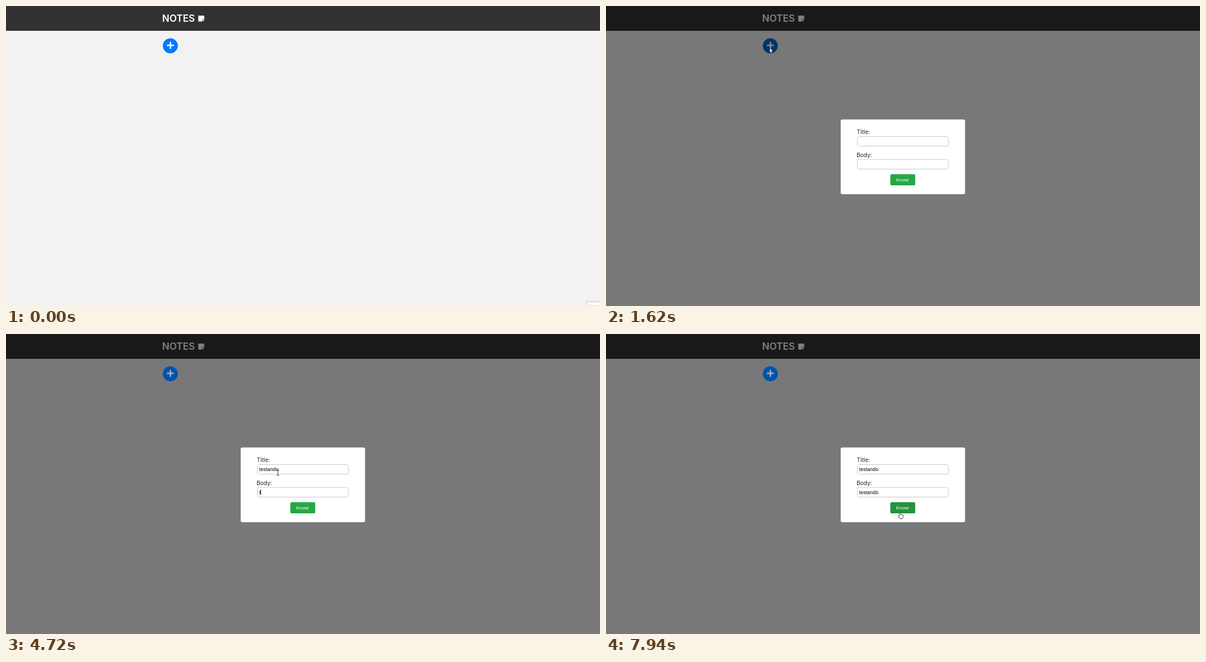
Recreate the animation shown at these times as an HTML page. Size 1053 by 532 pixels, loop 8000 ms.

```html
<!DOCTYPE html>
<html lang="en">
<head>
<meta charset="utf-8">
<title>Notes</title>
<style>
  html, body { margin: 0; width: 100%; height: 100%; overflow: hidden; background: #f2f2f2; }
  svg { display: block; width: 100%; height: 100%; }
  .head { font: 600 17px Inter, sans-serif; fill: #fff; }
  .label { font: 400 10px Inter, sans-serif; fill: #212529; }
  .field { font: 8.89px "Liberation Sans", Arial, sans-serif; fill: #000; }
  .send { font: 8.1px "Liberation Sans", Arial, sans-serif; fill: #fff; text-anchor: middle; }
  .hint { font: 7px "Liberation Sans", Arial, sans-serif; fill: #a9a9a9; }
  .box { fill: #fff; stroke: #c9c9c9; stroke-width: 1; }
</style>
</head>
<body>
<svg viewBox="0 0 1053 532" preserveAspectRatio="none">
  <rect width="1053" height="532" fill="#f2f2f2"/>
  <rect width="1053" height="44" fill="#323232"/>
  <text class="head" x="276.8" y="28">NOTES</text>
  <path transform="translate(340.8 16.2) scale(.0237)" fill="#fff" d="M312 320h136V56c0-13-11-24-24-24H24C11 32 0 43 0 56v400c0 13 11 24 24 24h264V344c0-13 11-24 24-24zm129 55l-98 98c-4 4-11 7-17 7h-6V352h128v6c0 6-3 12-7 17z"/>

  <g id="hint">
    <rect x="1029.5" y="524.5" width="40" height="12" fill="#fcfcfc" stroke="#c4c4c4"/>
    <text class="hint" x="1032" y="534.5">Gravar</text>
  </g>

  <rect id="dim" width="1053" height="532" opacity=".5"/>

  <circle id="add" cx="291.3" cy="70.5" r="13.3"/>
  <g id="plus">
    <rect x="285.2" y="68.4" width="12.6" height="2.7" rx=".9"/>
    <rect x="290.15" y="63.5" width="2.7" height="12.6" rx=".9"/>
  </g>

  <g id="modal">
    <rect x="416" y="201.3" width="220.5" height="132.4" rx="3.3" fill="#fff"/>
    <text class="label" x="444.6" y="227.2">Title:</text>
    <text class="label" x="444.2" y="268.2">Body:</text>
    <rect class="box" x="445.5" y="231.5" width="161.5" height="17" rx="3.6"/>
    <rect class="box" x="445.5" y="272.2" width="161.5" height="17" rx="3.6"/>
    <text id="title" class="field" x="448.8" y="242.9"></text>
    <text id="body" class="field" x="448.8" y="283.7"></text>
    <rect id="caret" width="1" height="9"/>
    <rect id="send" x="504" y="298.3" width="44.2" height="19.8" rx="2.7"/>
    <text class="send" x="526.1" y="311.2">Enviar</text>
  </g>

  <circle id="halo" r="6.5" fill="#ffee00" opacity=".5"/>
  <g id="cursor" stroke-linejoin="round">
    <path id="arrow" d="M.2 .2V9.1L2.2 7.2 3.5 10.2 5 9.6 3.7 6.6H6.6Z" fill="#fff" stroke="#111" stroke-width=".7"/>
    <path id="hand" d="M-1 1Q0-.2 1 1V5L5 5.8Q6 6.1 6 7.2L5.4 10.2 4.6 12.5H-.3L-3 8.4Q-3.2 7 -2 7.2L-1 8.2Z" fill="#fff" stroke="#111" stroke-width=".8"/>
    <path id="beam" d="M-2-4.5H-.6L0-4 .6-4.5H2M0-4V4.2M-2 4.7H-.6L0 4.2 .6 4.7H2" fill="none" stroke="#222" stroke-width=".9"/>
  </g>
</svg>
<script>
const LOOP = 8000, OPEN = 1620;
const WORD = "testando";
const titleKeys = [2910, 3040, 3190, 3390, 3460, 3730, 3800, 3860];
const bodyKeys = [4720, 4790, 4930, 5130, 5260, 6260, 6390, 6460];

// Each leg: duration of one hold, then [time, x, y] points.
const legs = [
  { hold: 69.1, points: [[320, 999, 515], [880, 262, 84], [1010, 237, 72], [1290, 285, 77], [1500, 290, 74]] },
  { hold: 70, points: [[1830, 292, 77], [2110, 486, 260], [2320, 482, 246]] },
  { hold: 68.4, points: [[7140, 483, 249], [7482, 521, 315]] }
];
const clicks = [[1570, 1620], [2380, 2450], [7810, 7940]];
const carets = [[2380, 5810], [6260, 6990], [7490, 7810]];

const el = {};
document.querySelectorAll("[id]").forEach(n => el[n.id] = n);

const show = (node, on) => node.setAttribute("visibility", on ? "visible" : "hidden");
const during = (spans, t) => spans.some(([a, b]) => t >= a && t < b);
const typed = (keys, t) => WORD.slice(0, keys.filter(k => t >= k).length);
const inside = (x, y, l, t, r, b) => x >= l && x <= r && y >= t && y <= b;
const ease = u => u * u * (3 - 2 * u);

function position(t) {
  const leg = legs.filter(l => t >= l.points[0][0]).pop();
  if (!leg) return null;
  const p = leg.points, start = p[0][0];
  const held = start + Math.floor((t - start) / leg.hold + 0.01) * leg.hold;
  const i = p.findIndex(q => held < q[0]);
  if (i < 0) return p[p.length - 1].slice(1);
  const [t0, x0, y0] = p[i - 1], [t1, x1, y1] = p[i];
  const u = ease((held - t0) / (t1 - t0));
  return [x0 + (x1 - x0) * u, y0 + (y1 - y0) * u];
}

function drawCursor(t, open) {
  const at = position(t);
  let kind = "";
  if (at) {
    const [x, y] = at;
    const onAdd = !open && Math.hypot(x - 291.3, y - 70.5) < 13.3;
    const onSend = open && inside(x, y, 504, 298, 548, 318);
    const onField = open && (inside(x, y, 445, 231, 607, 249) || inside(x, y, 445, 272, 607, 290));
    kind = onAdd || onSend ? "hand" : onField ? "beam" : "arrow";
    el.cursor.setAttribute("transform", `translate(${x} ${y})`);
    el.halo.setAttribute("cx", x - 0.4);
    el.halo.setAttribute("cy", y);
  }
  for (const k of ["arrow", "hand", "beam"]) show(el[k], k === kind);
  show(el.halo, during(clicks, t));
  return kind;
}

function render(t) {
  const open = t >= OPEN;
  const kind = drawCursor(t, open);
  const hover = kind === "hand";

  show(el.hint, t < 70);
  show(el.dim, open);
  el.add.setAttribute("fill", !open ? (hover ? "#0066d6" : "#007bff") : t < 1690 ? "#00346c" : "#0053aa");
  el.plus.setAttribute("fill", !open ? "#fff" : t < 1690 ? "#858b92" : "#a6adb5");

  el.modal.setAttribute("display", open ? "inline" : "none");
  if (!open) return;
  el.send.setAttribute("fill", hover ? "#23943e" : "#28a745");
  el.title.textContent = typed(titleKeys, t);
  el.body.textContent = typed(bodyKeys, t);

  const active = t < 4260 ? el.title : el.body;
  const width = active.textContent ? active.getComputedTextLength() : 0;
  el.caret.setAttribute("x", Math.round(448.8 + width - 0.6));
  el.caret.setAttribute("y", active === el.title ? 235 : 276);
  el.caret.setAttribute("display", during(carets, t) ? "inline" : "none");
}

const begin = performance.now();
function tick() {
  render((performance.now() - begin) % LOOP);
  requestAnimationFrame(tick);
}
tick();
</script>
</body>
</html>
```
